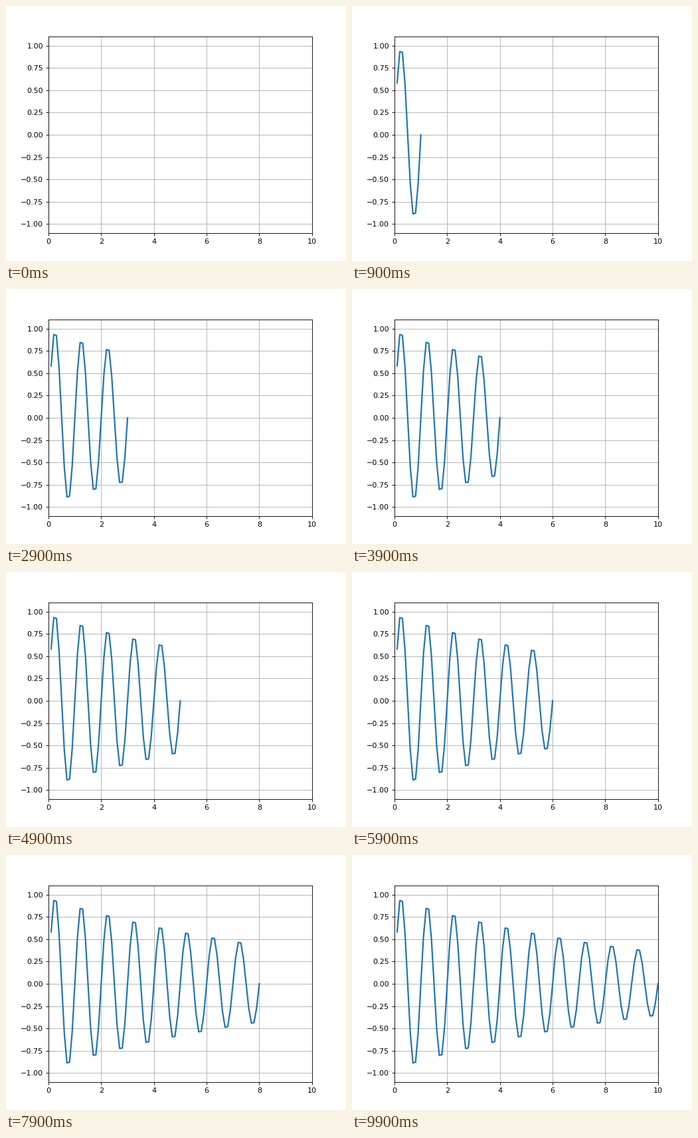
A matplotlib script that plays this animation: 512x384 px, repeating every 10 s.

```python
import numpy as np
import matplotlib.pyplot as plt
from matplotlib.animation import FuncAnimation

FRAMES = 100
STEP = 0.1

fig, ax = plt.subplots(figsize=(6.4, 4.8), dpi=80)
line, = ax.plot([], [], lw=2)
ax.set_xlim(0, 10)
ax.set_ylim(-1.1, 1.1)
ax.grid()

# Damped oscillation, sampled once per frame
t = STEP * np.arange(1, FRAMES + 1)
y = np.sin(2 * np.pi * t) * np.exp(-t / 10)


def init():
    line.set_data([], [])
    return line,


def update(i):
    line.set_data(t[:i + 1], y[:i + 1])
    return line,


anim = FuncAnimation(fig, update, frames=FRAMES, init_func=init,
                     interval=100, repeat=True, repeat_delay=0)
plt.show()
```
